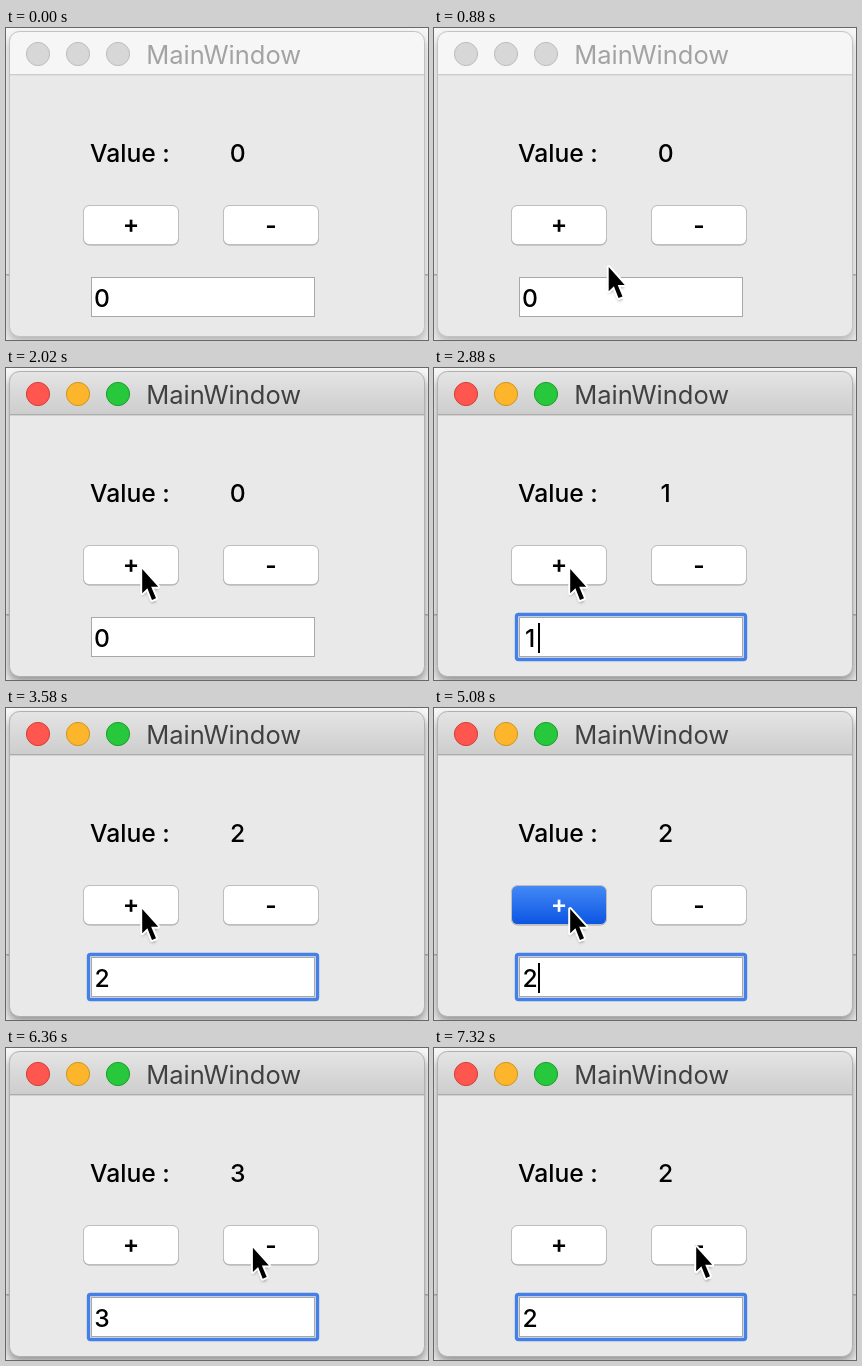
Recreate the animation shown at these times as an HTML page. Size 422 px wide and 312 px high, loop 8 s.

```html
<!DOCTYPE html>
<html lang="en">
<head>
<meta charset="utf-8">
<title>Counter window</title>
<style>
  html, body { margin: 0; width: 100%; height: 100%; overflow: hidden; }
  svg { display: block; width: 422px; height: 312px; }
  text { font: 500 24.7px Inter, "Open Sans", sans-serif; }
  #title { font-size: 25.5px; font-weight: 400; }
  #buttons text { font-weight: 600; }
  .mid { text-anchor: middle; }
</style>
</head>
<body>
<svg viewBox="0 0 422 312" xmlns="http://www.w3.org/2000/svg">
  <defs>
    <linearGradient id="bar" x1="0" y1="0" x2="0" y2="1">
      <stop offset="0" stop-color="#e5e5e5"/><stop offset="1" stop-color="#cdcdcd"/>
    </linearGradient>
    <linearGradient id="blue" x1="0" y1="0" x2="0" y2="1">
      <stop offset="0" stop-color="#4489f6"/><stop offset="1" stop-color="#0c55e2"/>
    </linearGradient>
    <filter id="soft" x="-20%" y="-20%" width="140%" height="140%"><feGaussianBlur stdDeviation="5"/></filter>
    <filter id="drop" x="-50%" y="-50%" width="200%" height="200%"><feGaussianBlur stdDeviation="1.5"/></filter>
    <clipPath id="frame"><rect x="3.5" y="3.5" width="415" height="305" rx="10"/></clipPath>
  </defs>

  <rect width="422" height="312" fill="#f6f6f6"/>
  <rect y="247" width="422" height="65" fill="#ececec"/>
  <rect y="246" width="422" height="1.5" fill="#b8b8b8"/>
  <rect id="shade" x="3" y="9" width="416" height="304" rx="10" filter="url(#soft)"/>

  <g clip-path="url(#frame)">
    <rect width="422" height="312" fill="#e9e9e9"/>
    <rect id="titlebar" x="3" y="3" width="416" height="43"/>
    <rect id="divider" x="3" y="46" width="416" height="1.4"/>
  </g>
  <rect id="edge" x="3.5" y="3.5" width="415" height="305" rx="10" fill="none"/>
  <g id="lights"></g>
  <text id="title" x="140.2" y="35.5">MainWindow</text>

  <text x="84" y="134">Value :</text>
  <text id="label" class="mid" x="231.7" y="134">0</text>

  <g id="buttons"></g>

  <rect id="field" x="85.5" y="249.5" width="223" height="39" fill="#fff" stroke="#a8a8a8"/>
  <rect id="ring" x="82.5" y="246.5" width="229" height="45" rx="2" fill="none" stroke="#4580e6" stroke-width="3.4"/>
  <text id="entry" class="mid" x="96" y="279">0</text>
  <rect id="caret" x="104" y="255" width="2" height="30"/>

  <g id="cursor">
    <path id="arrowShade" filter="url(#drop)" opacity=".4" transform="translate(0 3)"/>
    <path id="arrowRim" fill="#fff" stroke="#fff" stroke-width="4" stroke-linejoin="round"/>
    <path id="arrow"/>
  </g>
</svg>
<script>
const LOOP = 8000;
const NS = "http://www.w3.org/2000/svg";
const $ = id => document.getElementById(id);

function set(node, attrs) {
  for (const key in attrs) node.setAttribute(key, attrs[key]);
  return node;
}
function add(parent, tag, attrs) {
  return parent.appendChild(set(document.createElementNS(NS, tag), attrs));
}
const show = (id, on) => set($(id), { visibility: on ? "visible" : "hidden" });

function makeButton(x, sign, baseline) {
  const g = $("buttons");
  add(g, "rect", { x, y: 178, width: 96, height: 39.5, rx: 6.5, fill: "#a6a6a6" });
  add(g, "rect", { x, y: 177, width: 96, height: 40, rx: 6.5, fill: "#bebebe" });
  const face = add(g, "rect", { x: x + 1, y: 178, width: 94, height: 38, rx: 5.5, fill: "#fff" });
  const text = add(g, "text", { x: x + 48, y: baseline, class: "mid" });
  text.textContent = sign;
  return { face, text };
}
const plus = makeButton(77, "+", 205.2);
makeButton(217, "-", 206);

const lightColors = [["#ff564f", "#cf3f39"], ["#fdb62b", "#cf931f"], ["#27c83c", "#1a9c2b"]];
const lights = lightColors.map((c, i) =>
  add($("lights"), "circle", { cx: 32 + 40 * i, cy: 26, r: 11.6 }));

for (const id of ["arrowShade", "arrowRim", "arrow"])
  set($(id), { d: "M0 0V24.2L5.2 19.2L9.8 31L13.8 29.3L9 17.8H16Z" });

// Pointer waypoints: time, x, y
const path = [
  [480, 230, 313], [500, 227, 303], [700, 200, 269], [900, 172, 236], [1100, 151, 215],
  [1300, 138, 203], [1340, 136.2, 201], [5780, 136.2, 201], [5960, 192.2, 201],
  [6040, 192.2, 201], [6300, 241, 200], [6520, 262.2, 199], [LOOP, 262.2, 199]
];

function pointer(t) {
  let i = 1;
  while (i < path.length - 1 && path[i][0] <= t) i++;
  const [t0, x0, y0] = path[i - 1], [t1, x1, y1] = path[i];
  const k = Math.max(0, Math.min(1, (t - t0) / (t1 - t0)));
  return [x0 + (x1 - x0) * k, y0 + (y1 - y0) * k];
}

const within = (t, a, b) => t >= a && t < b;

function draw(ms) {
  const t = ms % LOOP;
  const active = t >= 2020;
  const focused = t >= 2140;
  const pressed = within(t, 2140, 2160) || within(t, 5080, 5100);
  const value = t < 2160 ? 0 : t < 3580 ? 1 : t < 5100 ? 2 : t < 7320 ? 3 : 2;

  set($("shade"), { opacity: active ? 0.4 : 0.25 });
  set($("titlebar"), { fill: active ? "url(#bar)" : "#f6f6f6" });
  set($("divider"), { fill: active ? "#acacac" : "#cecece" });
  set($("edge"), { stroke: active ? "#b0b0b0" : "#c2c2c2" });
  set($("title"), { fill: active ? "#404040" : "#a3a3a3" });
  lights.forEach((dot, i) => {
    const [fill, stroke] = active ? lightColors[i] : ["#d7d7d7", "#bdbdbd"];
    set(dot, { fill, stroke });
  });

  $("label").textContent = $("entry").textContent = value;
  set(plus.face, { fill: pressed ? "url(#blue)" : "#fff" });
  set(plus.text, { fill: pressed ? "#fff" : "#000" });
  show("ring", focused);
  show("caret", within(t, 2140, 3540) || within(t, 5080, 6080));

  const [x, y] = pointer(t);
  show("cursor", t >= 500);
  set($("cursor"), { transform: `translate(${x.toFixed(1)} ${y.toFixed(1)})` });
}

const start = performance.now();
function tick() {
  draw(performance.now() - start);
  requestAnimationFrame(tick);
}
draw(0);
requestAnimationFrame(tick);
</script>
</body>
</html>
```
